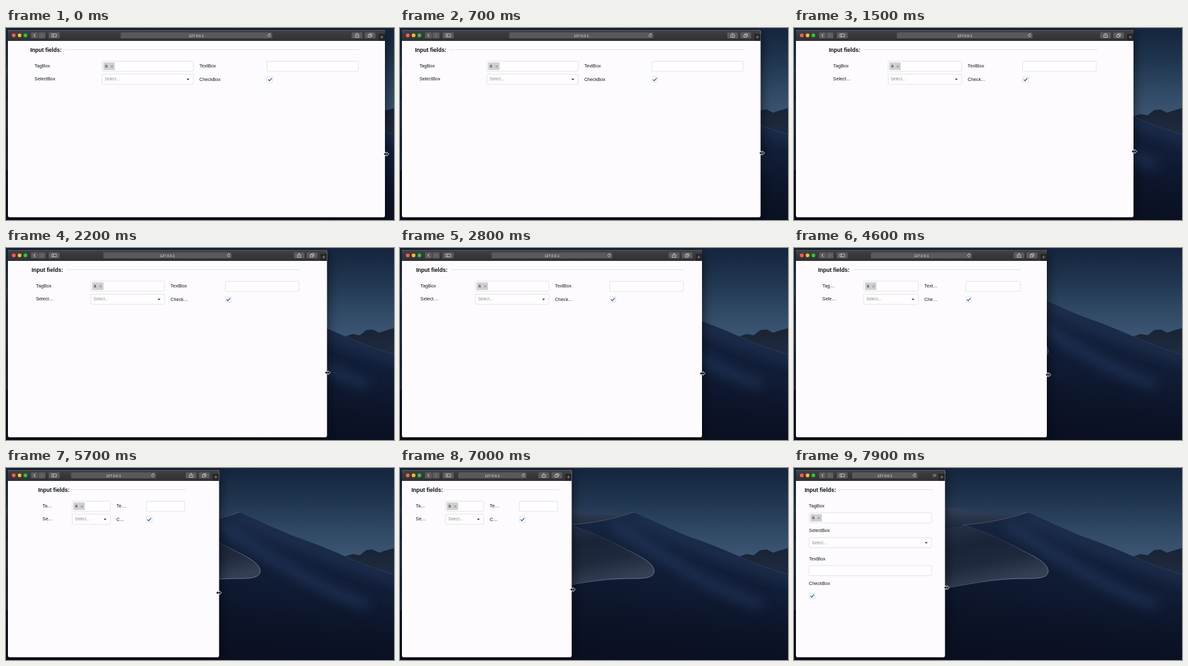
These frames come from a looping animation (600x297 px, 8000 ms). An HTML page with a canvas:

```html
<!DOCTYPE html>
<html lang="en">
<head>
<meta charset="utf-8">
<title>Responsive form</title>
<style>
html, body { margin: 0; width: 100%; height: 100%; overflow: hidden; background: #0b1222; }
canvas { display: block; width: 600px; height: 297px; }
</style>
</head>
<body>
<canvas id="stage"></canvas>
<script>
const LOOP = 8000, STEP = 100, SW = 600, SH = 297;
const SANS = '"Liberation Sans", Arial, sans-serif';
const canvas = document.getElementById('stage');
const dpr = window.devicePixelRatio || 1;
canvas.width = SW * dpr;
canvas.height = SH * dpr;
const ctx = canvas.getContext('2d');

// time, right edge of the window, pointer offset, pointer height
const KEYS = [
  [0, 586, 2, 195], [900, 549.5, 2, 193], [1500, 525, 1, 191],
  [1800, 516, 1, 192], [2800, 467, 0.5, 194], [3600, 431, 1, 195],
  [4600, 391, 2, 196], [5700, 329.5, -0.5, 193], [7000, 265.5, 1.5, 188],
  [7900, 233.5, 2.5, 185]
];

// smallest window edge, container width, labels
const LAYOUTS = [
  [547, 510, 'TagBox', 'SelectBox', 'TextBox', 'CheckBox'],
  [452, 416, 'TagBox', 'Select…', 'TextBox', 'Check…'],
  [351, 315.5, 'Tag…', 'Sele…', 'Text…', 'Che…'],
  [264, 229, 'Ta…', 'Se…', 'Te…', 'C…']
];

function pose(t) {
  let i = 0;
  while (i < KEYS.length - 2 && t >= KEYS[i + 1][0]) i++;
  const a = KEYS[i], b = KEYS[i + 1];
  const p = Math.min(1, (t - a[0]) / (b[0] - a[0]));
  return a.map((v, k) => v + (b[k] - v) * p);
}

function gradient(g, stops) {
  stops.forEach((c, i) => g.addColorStop(i / (stops.length - 1), c));
  return g;
}
const linear = (x0, y0, x1, y1, ...stops) =>
  gradient(ctx.createLinearGradient(x0, y0, x1, y1), stops);

function fillPath(d, style) {
  ctx.fillStyle = style;
  ctx.fill(new Path2D(d));
}

function strokePath(d, style, width = 1) {
  ctx.strokeStyle = style;
  ctx.lineWidth = width;
  ctx.stroke(new Path2D(d));
}

function box(x, y, w, h, r, fill, stroke, width = 0.7) {
  ctx.beginPath();
  ctx.roundRect(x, y, w, h, r);
  if (fill) { ctx.fillStyle = fill; ctx.fill(); }
  if (stroke) { ctx.strokeStyle = stroke; ctx.lineWidth = width; ctx.stroke(); }
}

function dot(x, y, r, fill) {
  ctx.beginPath();
  ctx.arc(x, y, r, 0, 7);
  ctx.fillStyle = fill;
  ctx.fill();
}

function text(s, x, y, size, fill, weight = '', align = 'left') {
  ctx.font = `${weight} ${size}px ${SANS}`;
  ctx.textAlign = align;
  ctx.fillStyle = fill;
  ctx.fillText(s, x, y);
}

function wallpaper() {
  ctx.fillStyle = linear(0, 0, 0, 150, '#14253d', '#20354f', '#314a66', '#405a78');
  ctx.fillRect(0, 0, SW, SH);
  for (let i = 0; i < 22; i++) {
    dot(240 + (i * 137.5) % 355, 6 + (i * 41.3) % 75, 0.35, 'rgba(190,210,235,.35)');
  }
  fillPath('M500 143 L524 137 L536 133 L547 135 L557 127 L567 126 L577 131 L586 128 L600 124 V180 H500Z',
    linear(0, 124, 0, 165, '#192335', '#202b40'));

  // back slope, main dune, curled foreground slope
  fillPath('M0 62 C120 48 190 56 236 61 C275 64 300 72 325 73 Q345 73 362 68 L380 130 L200 200 H0Z',
    linear(0, 58, 0, 110, '#34445d', '#252f44', '#1b2438'));
  const dune = 'M362 68 C385 78 410 91 450 107 C490 121 515 132 545 146 Q575 157 600 165 V297 H0 V120 L262 88 C300 85 330 79 362 68Z';
  fillPath(dune, linear(400, 75, 350, 297, '#1a2a46', '#111d37', '#0d162c', '#0b1225'));
  ctx.save();
  ctx.clip(new Path2D(dune));
  ctx.filter = 'blur(9px)';
  strokePath('M330 86 C390 125 445 170 560 214', 'rgba(42,66,106,.6)', 14);
  strokePath('M362 75 C430 107 510 140 610 174', 'rgba(38,60,96,.5)', 14);
  ctx.restore();
  fillPath('M0 110 C140 100 220 97 262 88 C298 99 325 113 354 128 C383 142 394 151 393 161 C391 171 375 171 352 171 C310 171 270 180 234 186 L0 220Z',
    linear(250, 90, 270, 185, '#263147', '#1a2438', '#1f293d', '#343f54'));
  strokePath('M262 88 C300 85 330 79 362 68', 'rgba(96,115,142,.65)', 0.9);
  strokePath('M362 68 C385 78 410 91 450 107 C490 121 515 132 545 146 Q575 157 600 165', 'rgba(58,82,116,.55)', 0.9);
  strokePath('M262 88 C298 99 325 113 354 128 C383 142 394 151 393 161 C391 171 375 171 352 171 C310 171 270 180 234 186',
    linear(262, 88, 330, 178, 'rgba(90,108,135,.3)', 'rgba(80,98,126,.35)', 'rgba(142,156,178,.75)'), 0.9);
  ctx.fillStyle = linear(0, 200, 0, 297, 'rgba(9,15,32,0)', 'rgba(9,14,29,.6)');
  ctx.fillRect(0, 200, SW, 97);
}

function button(x, w) {
  box(x, 6.8, w, 9.2, 1.6, '#5b5b5e');
}

function toolbar(edge) {
  const w = edge - 3;
  ctx.fillStyle = linear(0, 3, 0, 20, '#434346', '#38383a', '#313133');
  ctx.fillRect(3, 3, w, 17);
  ctx.fillStyle = 'rgba(255,255,255,.16)';
  ctx.fillRect(3, 3, w, 0.7);
  ['#fc5b57', '#fdbc2e', '#2bc840'].forEach((c, i) => dot(12 + i * 9, 11.4, 2.8, c));

  button(38.7, 10.8);
  button(50.3, 10.8);
  strokePath('M45.2 9.2 L42.9 11.4 L45.2 13.6', '#f2f2f2', 0.9);
  strokePath('M54.8 9.2 L57 11.4 L54.8 13.6', '#8c8c8e', 0.8);
  button(66, 17);
  strokePath('M71 9.2 H78 V13.7 H71Z M73.4 9.2 V13.7', '#dedede', 0.7);

  const barW = Math.max(101, 0.402 * w);
  const barX = Math.max(90, 3 + w / 2 - barW / 2);
  const barEnd = barX + barW;
  box(barX, 6.8, barW, 9.2, 1.6, '#59595c');
  text('127.0.0.1', barX + barW / 2, 13.5, 5.5, '#f5f5f5', '', 'center');
  ctx.beginPath();
  ctx.arc(barEnd - 4.8, 11.5, 2, -0.4, 4.9);
  ctx.strokeStyle = '#dcdcdc';
  ctx.lineWidth = 0.7;
  ctx.stroke();
  fillPath(`M${barEnd - 4.6} 8.2 l2 1.2 l-2 1.2Z`, '#dcdcdc');

  if (edge >= 246) {
    const a = edge - 51.5, b = edge - 31.3;
    button(a, 16.7);
    strokePath(`M${a + 7} 10.5 h-1.4 v4 h5.4 v-4 h-1.4 M${a + 8.3} 12.8 v-4.8 M${a + 6.9} 9.3 l1.4 -1.4 l1.4 1.4`, '#e4e4e4', 0.7);
    button(b, 16.7);
    strokePath(`M${b + 5.5} 10.5 h4 v3.6 h-4Z M${b + 7.2} 10.5 v-1.7 h4 v3.6 h-1.7`, '#e4e4e4', 0.7);
  } else {
    const x = edge - 18.8;
    strokePath(`M${x} 9.3 l2.2 2.2 l-2.2 2.2 M${x + 2.8} 9.3 l2.2 2.2 l-2.2 2.2`, '#e4e4e4', 0.8);
  }
  ctx.fillStyle = '#252527';
  ctx.fillRect(edge - 10.5, 8.5, 10.5, 11.5);
  strokePath(`M${edge - 10.5} 20 V8.5 H${edge}`, '#505052', 0.5);
  strokePath(`M${edge - 7.5} 14 h5 M${edge - 5} 11.5 v5`, '#a5a5a7', 0.7);
}

const label = (s, x, mid) => text(s, x, mid + 2.3, 7.2, '#171717');

function field(x, y, w) {
  box(x + 0.3, y + 0.3, w - 0.6, 15.6, 1.6, '#fffdff', '#d9d8da');
}

function tagBox(x, y, w) {
  field(x, y, w);
  box(x + 2.3, y + 2.3, 17.6, 11.6, 1, '#d0d0d1');
  text('a', x + 5, y + 10.2, 6.6, '#222');
  const cx = x + 15.4, cy = y + 8.4;
  strokePath(`M${cx - 1.7} ${cy - 1.7} l3.4 3.4 m0 -3.4 l-3.4 3.4`, '#858585', 1);
}

function selectBox(x, y, w) {
  field(x, y, w);
  text('Select...', x + 4.5, y + 10.2, 6.3, '#8d8d8d');
  fillPath(`M${x + w - 10.8} ${y + 7.2} h4.4 l-2.2 2.4Z`, '#222');
}

function checkBox(x, y) {
  box(x + 0.4, y + 0.4, 9, 9, 1, '#fffdff', '#d5d4d6');
  strokePath(`M${x + 2.1} ${y + 4.9} l2 2.1 l3.8 -4.3`, '#2465a8', 1.3);
}

function form(edge) {
  const row = LAYOUTS.find(l => edge >= l[0]);
  const width = row ? row[1] : edge - 34;
  const left = edge / 2 - 0.9 - width / 2;
  const x = left + 7;

  text('Input fields:', left + 0.3, 36.6, 8.6, '#0c0c0c', 'bold');
  ctx.fillStyle = '#dddcde';
  ctx.fillRect(left + 53.5, 33.1, width - 53.5, 0.8);

  if (!row) {
    const w = width - 9.5;
    label('TagBox', x, 58.7);
    tagBox(x, 69, w);
    label('SelectBox', x, 97);
    selectBox(x, 107.5, w);
    label('TextBox', x, 140.3);
    field(x, 150.7, w);
    label('CheckBox', x, 179);
    checkBox(x, 193);
    return;
  }
  const col = width / 2;
  const start = 0.4167 * col + 4.9;
  const w = col - 2 - start;
  const fx = left + start;
  label(row[2], x, 58.8);
  label(row[3], x, 79);
  label(row[4], x + col, 58.8);
  label(row[5], x + col, 79.3);
  tagBox(fx, 51, w);
  selectBox(fx, 71.2, w);
  field(fx + col, 51.2, w);
  checkBox(fx + col, 74.7);
}

function pointer(x, y) {
  const d = `M${x - 3.8} ${y} l2.6 -2.3 v1.6 h2.4 v-1.6 l2.6 2.3 l-2.6 2.3 v-1.6 h-2.4 v1.6Z`;
  strokePath(d, '#f0f0f0', 1.2);
  fillPath(d, '#101010');
}

function draw(time) {
  const t = Math.floor((time % LOOP) / STEP) * STEP;
  const [, edge, dx, py] = pose(t);
  ctx.setTransform(dpr, 0, 0, dpr, 0, 0);
  wallpaper();

  ctx.save();
  ctx.shadowColor = 'rgba(0,0,0,.65)';
  ctx.shadowBlur = 18 * dpr;
  ctx.shadowOffsetY = 5 * dpr;
  box(3, 3, edge - 3, 289.7, 2.8, '#fdfbfe');
  ctx.restore();

  ctx.save();
  ctx.beginPath();
  ctx.roundRect(3, 3, edge - 3, 289.7, 2.8);
  ctx.clip();
  toolbar(edge);
  form(edge);
  ctx.restore();
  pointer(edge + dx, py);
}

const begin = performance.now();
function tick() {
  draw(performance.now() - begin);
  requestAnimationFrame(tick);
}
tick();
</script>
</body>
</html>
```
